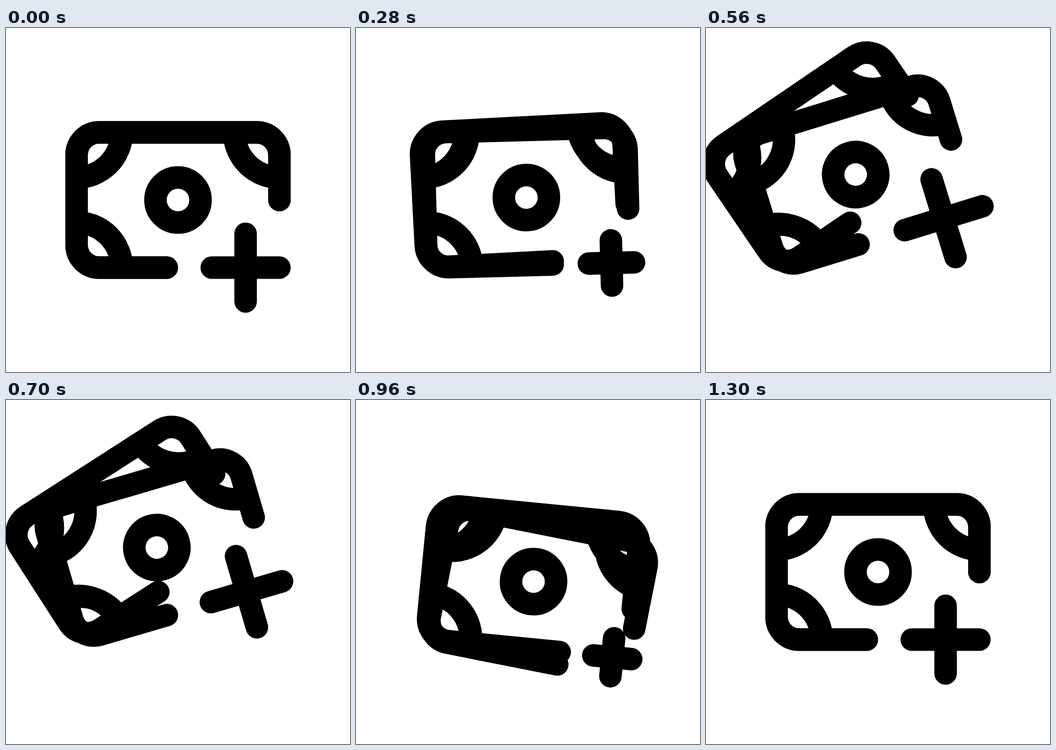
Animation of 748 by 748 pixels, one loop 2180 ms. Source, as an HTML page:

```html
<!DOCTYPE html>
<html lang="en">
<head>
<meta charset="utf-8">
<title>Banknote plus</title>
<style>
  html, body { margin: 0; height: 100%; overflow: hidden; background: #fff; }
  svg { display: block; width: 100%; height: 100%; }
</style>
</head>
<body>
<svg viewBox="0 0 748 748">
  <g transform="translate(80 80) scale(24.5)" fill="none" stroke="#000" stroke-width="2"
     stroke-linecap="round" stroke-linejoin="round">
    <path id="back"/>
    <g id="front">
      <path id="bill"/>
      <circle cx="12" cy="12" r="2"/>
      <path id="plus"/>
    </g>
  </g>
</svg>
<script>
const LOOP = 2180, STEP = 20;
const $ = id => document.getElementById(id);

// Each pose: tilt, bottom end shift, side end shift, plus shift, plus half length
const REST = [0, 0, 0, 0, 3];
const DIP = [5.6, 3.92, 1.55, 1.61, 1.69];
const LIFT = [-18, -1.5, -0.9, 0.05, 4];

const easeOut = k => x => 1 - (1 - x) ** k;
const easeIn = k => x => x ** k;

// start, end, from, to, tilt easing, shape easing
const MOVES = [
  [0, 200, REST, DIP, easeOut(1.5), easeIn(1)],
  [200, 620, DIP, LIFT, easeOut(1.69), easeIn(1.2)],
  [620, 960, LIFT, DIP, easeIn(1.84), easeOut(1.37)],
  [960, 1300, DIP, REST, easeIn(1), easeIn(1)]
];

function poseAt(t) {
  const move = MOVES.find(m => t < m[1]);
  if (!move) return REST;
  const [start, end, from, to, tiltEase, shapeEase] = move;
  const x = (t - start) / (end - start);
  return from.map((v, i) => v + (to[i] - v) * (i ? shapeEase : tiltEase)(x));
}

const billPath = (bottom, side) =>
  `M21 ${12 + side}V8a2 2 0 0 0-2-2H5a2 2 0 0 0-2 2V16a2 2 0 0 0 2 2H${11 + bottom}` +
  'M7 6a4 4 0 0 1-4 4M17 6a4 4 0 0 0 4 4M3 14a4 4 0 0 1 4 4';

const turn = (id, angle) => $(id).setAttribute('transform', `rotate(${angle} 3.51 17.45)`);

function draw(now) {
  const t = Math.floor(now % LOOP / STEP) * STEP;
  const [tilt, bottom, side, shift, half] = poseAt(t);
  const outline = billPath(bottom, side);
  $('bill').setAttribute('d', outline);
  $('back').setAttribute('d', outline);
  $('plus').setAttribute('d',
    `M${18 + shift - half} 18h${2 * half}M${18 + shift} ${18 - half}v${2 * half}`);
  turn('front', tilt);
  turn('back', 2 * tilt);
}

const begin = performance.now();
function tick() {
  draw(performance.now() - begin);
  requestAnimationFrame(tick);
}
tick();
</script>
</body>
</html>
```
